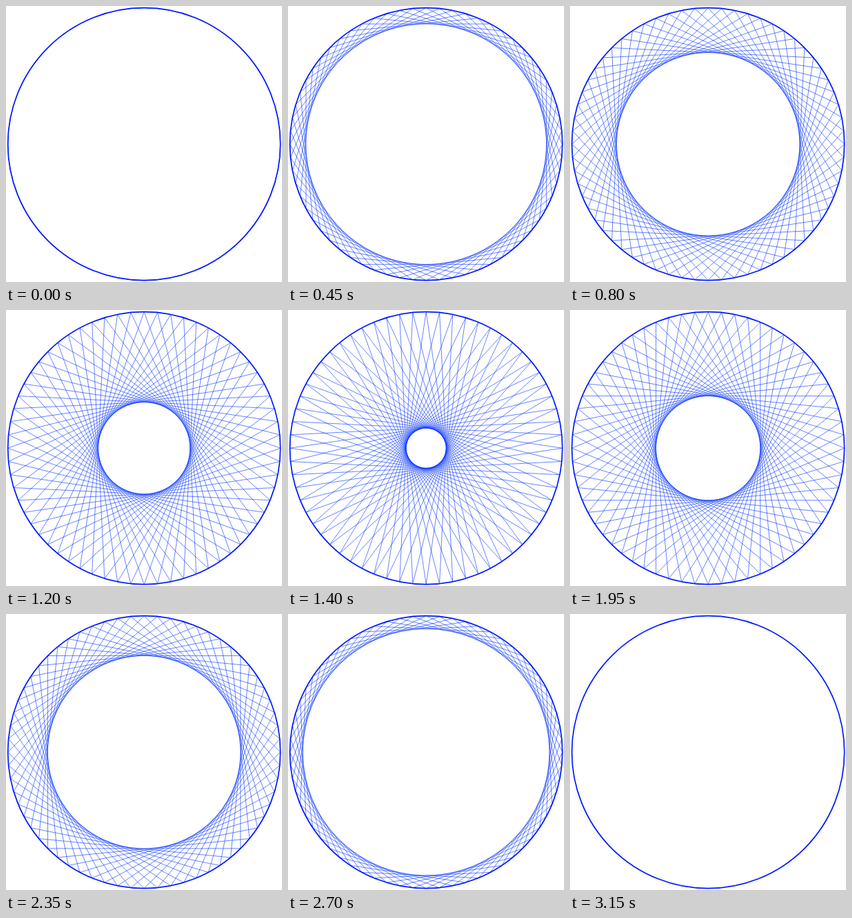
Animation of 400x400 px, one loop 3200 ms. Source, as an HTML page with a canvas:

```html
<!DOCTYPE html>
<html>
<head>
<meta charset="utf-8">
<style>
html, body { margin: 0; width: 100%; height: 100%; overflow: hidden; background: #fff; }
canvas { display: block; }
</style>
</head>
<body>
<canvas id="stage" width="400" height="400"></canvas>
<script>
const ctx = document.getElementById('stage').getContext('2d');
const POINTS = 64, STEP_MS = 50, CENTER = 200.2, RADIUS = 197.5;

function point(i) {
  const a = i / POINTS * Math.PI * 2 - Math.PI / 2;
  return [CENTER + RADIUS * Math.cos(a), CENTER + RADIUS * Math.sin(a)];
}

// Join every point on the circle to the one `skip` places further on.
function draw(skip) {
  ctx.fillStyle = '#fff';
  ctx.fillRect(0, 0, 400, 400);

  ctx.strokeStyle = '#0030ff';
  ctx.lineWidth = 0.6;
  for (let i = 0; i < POINTS; i++) {
    ctx.beginPath();
    ctx.moveTo(...point(i));
    ctx.lineTo(...point(i + skip));
    ctx.stroke();
  }

  ctx.strokeStyle = '#0018ff';
  ctx.lineWidth = 1.7;
  ctx.beginPath();
  ctx.arc(CENTER, CENTER, RADIUS, 0, Math.PI * 2);
  ctx.stroke();
}

function tick() {
  draw(Math.floor(performance.now() / STEP_MS) % POINTS + 1);
  requestAnimationFrame(tick);
}
tick();
</script>
</body>
</html>
```
